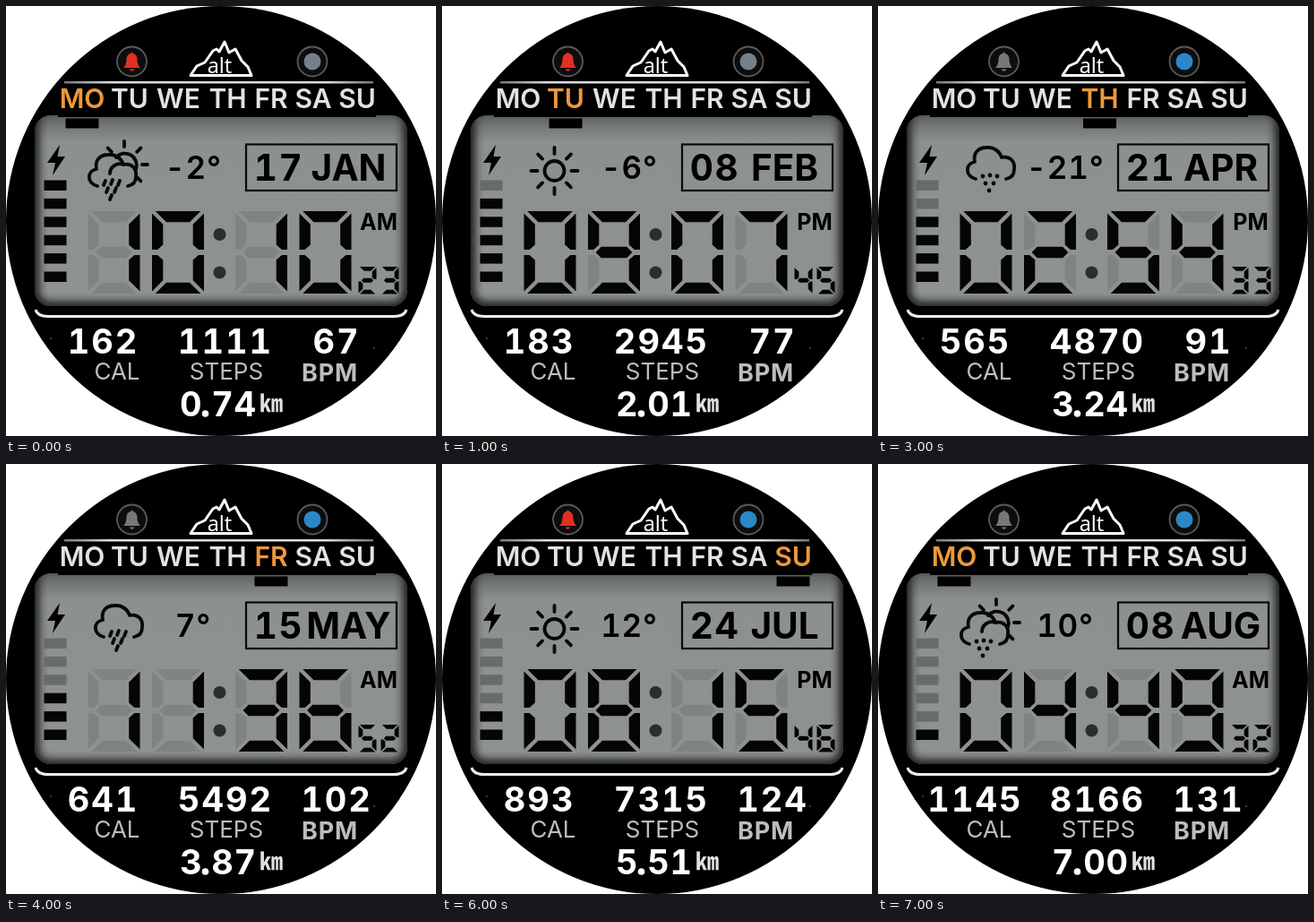
Animation, 480 px wide and 480 px high, one loop 8000 ms. Source, as an HTML page:

```html
<!DOCTYPE html>
<html lang="en">
<head>
<meta charset="utf-8">
<title>Digital watch face</title>
<style>
  html, body { margin: 0; width: 100%; height: 100%; overflow: hidden; background: #fff; }
  svg { display: block; width: 100vw; height: 100vh; }
  text { font-family: Inter, "Liberation Sans", sans-serif; font-feature-settings: "tnum"; }
  .mid { text-anchor: middle; }
  .day { font-size: 30px; font-weight: 600; fill: #e2e2e2; }
  .day.on { fill: #ee983a; }
  .date { font-size: 40.5px; font-weight: 700; }
  #date { letter-spacing: 1.5px; }
  .temp { font-size: 35px; font-weight: 600; letter-spacing: .8px; }
  .half { font-size: 25px; font-weight: 700; }
  .num { font-size: 38px; font-weight: 700; letter-spacing: 2px; fill: #fff; }
  .dist { font-size: 38px; font-weight: 700; letter-spacing: .6px; fill: #fff; }
  .label { font-size: 26px; fill: #bdbdbd; }
  .wide { font-size: 27px; font-weight: 700; letter-spacing: .8px; }
  .unit { font: 700 26px "Noto Sans CJK JP", "Noto Sans CJK SC", sans-serif; fill: #e0e0e0; }
  .alt { font: 500 23.5px "Noto Sans", "Open Sans", sans-serif; fill: #fff; }
  .line { fill: none; stroke: #080808; stroke-width: 3.8; stroke-linecap: round; stroke-linejoin: round; }
</style>
</head>
<body>
<svg viewBox="0 0 480 480">
  <defs>
    <filter id="soft" x="-10%" y="-10%" width="120%" height="120%"><feGaussianBlur stdDeviation="4.5"/></filter>
    <clipPath id="glass"><rect x="32" y="122" width="416" height="213" rx="18"/></clipPath>
    <linearGradient id="lcd" x2="0" y2="1">
      <stop offset="0" stop-color="#5c5f5f"/>
      <stop offset=".06" stop-color="#757878"/>
      <stop offset=".14" stop-color="#8c9090"/>
      <stop offset="1" stop-color="#8e9292"/>
    </linearGradient>
    <linearGradient id="rule">
      <stop offset="0" stop-color="#777"/>
      <stop offset=".15" stop-color="#ddd"/>
      <stop offset=".85" stop-color="#ddd"/>
      <stop offset="1" stop-color="#777"/>
    </linearGradient>
  </defs>

  <circle cx="240" cy="240" r="240"/>
  <g fill="#0d0d0d" stroke="#5a5a5a" stroke-width="1.8">
    <circle cx="140.500" cy="62" r="16.500"/>
    <circle cx="342" cy="62" r="16.500"/>
  </g>
  <g id="bell">
    <path d="M131 69Q134.500 66 134.500 59Q135 54 139 53Q140.500 50 142 53Q146 54 146.500 59Q146.500 66 150 69Z"/>
    <path d="M137.500 70.500H143.500Q140.500 75 137.500 70.500Z"/>
  </g>
  <circle id="link" cx="342" cy="62" r="9.500"/>
  <path d="M206 77.500L213 67L222 63L231 50L235 48L238 51L244 40L249 52L256 48L263 61L270 68L274 77.500Z"
    fill="none" stroke="#fff" stroke-width="3" stroke-linejoin="round"/>
  <text class="alt mid" x="238.500" y="74.500">alt</text>
  <rect x="65" y="84" width="345" height="2.500" fill="url(#rule)"/>
  <g id="days"></g>

  <g clip-path="url(#glass)">
    <rect x="32" y="122" width="416" height="213" fill="url(#lcd)"/>
    <rect x="31" y="110" width="418" height="226" rx="18" fill="none" stroke="#222424" stroke-width="13" filter="url(#soft)"/>
  </g>
  <rect x="58" y="118" width="355" height="6"/>
  <rect id="mark" y="125.500" width="37" height="11"/>
  <path d="M60 155L46 175H55L52 189L66 168H57.500Z"/>
  <g id="cells"></g>
  <g id="sky" class="line"></g>
  <text id="temp" class="temp mid" x="209" y="192.500"></text>
  <rect x="268" y="154.500" width="168" height="51.500" fill="none" stroke="#0a0a0a" stroke-width="2.200"/>
  <text id="date" class="date mid" x="304.500" y="195"></text>
  <text id="month" class="date mid" x="382.500" y="195"></text>
  <g id="time"></g>
  <g fill="#2c2e2e"><circle cx="238.500" cy="255" r="7"/><circle cx="238.500" cy="297.500" r="7"/></g>
  <text id="half" class="half mid" x="416" y="250"></text>
  <g id="secs"></g>

  <path d="M33 339Q35 346.500 47 346.500H433Q445 346.500 447 339" fill="none" stroke="#eee" stroke-width="3"/>
  <g fill="#8a3c12"><circle cx="50" cy="371" r="1"/><circle cx="411" cy="382" r="1"/></g>
  <text id="cal" class="num mid" x="108.500" y="387.500"></text>
  <text id="steps" class="num mid" x="245" y="387.500"></text>
  <text id="bpm" class="num mid" x="369" y="387.500"></text>
  <text class="label mid" x="124" y="416.500">CAL</text>
  <text class="label mid" x="246" y="416.500">STEPS</text>
  <text class="label wide mid" x="361.500" y="419">BPM</text>
  <text id="whole" class="dist mid" x="206.500" y="458">0</text>
  <circle cx="222.500" cy="455" r="3.800" fill="#fff"/>
  <text id="part" class="dist mid" x="254.500" y="458"></text>
  <text class="unit" x="283" y="453">㎞</text>
</svg>
<script>
const STEP = 1000;
const keys = "day date month temp time half secs cells cal steps bpm dist sky bell link".split(" ");
const table = [
  "MO 17 JAN -2 1010 AM 23 6 162 1111 67 0.74 sunRain 1 0",
  "TU 08 FEB -6 0907 PM 45 5 183 2945 77 2.01 sun 1 0",
  "WE 23 MAR 5 1002 AM 29 4 486 3203 83 2.79 rain 0 1",
  "TH 21 APR -21 0254 PM 33 4 565 4870 91 3.24 snow 0 1",
  "FR 15 MAY 7 1136 AM 52 3 641 5492 102 3.87 rain 0 1",
  "SA 18 JUN 8 0327 PM 19 3 717 6483 112 4.26 sunSnow 1 1",
  "SU 24 JUL 12 0815 PM 46 2 893 7315 124 5.51 sun 1 1",
  "MO 08 AUG 10 0449 AM 32 1 1145 8166 131 7.00 sunSnow 0 1"
].map(row => Object.fromEntries(row.split(" ").map((v, i) => [keys[i], v])));

const dayNames = ["MO", "TU", "WE", "TH", "FR", "SA", "SU"];
const dayX = [85, 138, 192.5, 247.5, 296, 343, 392];
const lit = ["abcdef", "bc", "abged", "abgcd", "fgbc", "afgcd", "afgedc", "abc", "abcdefg", "abcdfg"];
const $ = id => document.getElementById(id);

// Seven mitred bars in a box of w by h, each t thick.
function segments(w, h, t) {
  const m = h / 2, k = t / 2;
  const side = (x, dir, y0, y1) => {
    const s = Math.sign(y1 - y0), inner = x + dir * t;
    return [[x, y0 + s * t * .2], [inner, y0 + s * t * 1.2], [inner, y1 - s * t * .7],
            [x + dir * k, y1 - s * t * .25], [x, y1 - s * t * .25]];
  };
  const cap = (y, dir) => [[t * .3, y], [w - t * .3, y], [w - t * 1.3, y + dir * t], [t * 1.3, y + dir * t]];
  return {
    a: cap(0, 1),
    b: side(w, -1, 0, m),
    c: side(w, -1, h, m),
    d: cap(h, -1),
    e: side(0, 1, h, m),
    f: side(0, 1, 0, m),
    g: [[t * .7, m], [t * 1.2, m - k], [w - t * 1.2, m - k], [w - t * .7, m], [w - t * 1.2, m + k], [t * 1.2, m + k]]
  };
}

function digits(text, xs, y, shape, ghost) {
  return [...text].map((ch, i) => {
    const parts = Object.entries(shape).map(([name, pts]) => {
      const on = lit[ch].includes(name);
      if (!on && (!ghost || (name === "g" && "07".includes(ch)))) return "";
      return `<polygon points="${pts.join(" ")}" fill="${on ? "#050505" : "#7f8383"}"/>`;
    });
    return `<g transform="translate(${xs[i]} ${y})">${parts.join("")}</g>`;
  }).join("");
}

const big = segments(58, 92, 12.3), small = segments(20, 30.5, 4.8);
const path = d => `<path d="${d}"/>`;
const cloud = path("M109 193C97 190 97 176 108 174C106 164 112 158 121 158C130 157 136 163 138 169C148 167 153 174 152 182C152 188 149 192 143 193");
const rays = (cx, cy, r0, r1, from, count) => Array.from({ length: count }, (_, i) => {
  const a = (from + i * 45) * Math.PI / 180, c = Math.cos(a), s = Math.sin(a);
  return path(`M${cx + r0 * c} ${cy + r0 * s}L${cx + r1 * c} ${cy + r1 * s}`);
}).join("");
const drops = [[117, 190], [125, 189], [133, 190], [120, 198], [129, 198], [124, 206]];
const rain = drops.map(([x, y]) => path(`M${x + 1} ${y - 3}L${x - 1} ${y + 2}`)).join("");
const snow = drops.map(([x, y]) => `<circle cx="${x}" cy="${y}" r="2.400" fill="#080808" stroke="none"/>`).join("");
const behind = fall => path("M123 169A13 13 0 0 1 145 182") + rays(132, 177, 20, 26, -135, 5) +
  `<g transform="translate(-7 8)">${cloud}${path("M123 179A11 11 0 0 1 138 169")}${fall}</g>`;
const skies = {
  sun: `<circle cx="125.500" cy="184" r="11"/>` + rays(125.5, 184, 19, 26, 0, 8),
  rain: cloud + rain,
  snow: cloud + snow,
  sunRain: behind(rain),
  sunSnow: behind(snow)
};

$("days").innerHTML = dayNames.map((d, i) => `<text class="day mid" x="${dayX[i]}" y="114">${d}</text>`).join("");
$("cells").innerHTML = Array.from({ length: 6 }, (_, i) =>
  `<rect x="42.500" y="${194.5 + i * 20.4}" width="25" height="11.500"/>`).join("");

function show(s) {
  const day = dayNames.indexOf(s.day);
  [...$("days").children].forEach((el, i) => el.classList.toggle("on", i === day));
  $("mark").setAttribute("x", dayX[day] - 18.5);
  [...$("cells").children].forEach((el, i) => el.setAttribute("fill", i >= 6 - s.cells ? "#050505" : "#686b6b"));
  for (const id of ["date", "month", "half", "cal", "steps", "bpm"]) $(id).textContent = s[id];
  $("temp").textContent = s.temp + "°";
  [$("whole").textContent, $("part").textContent] = s.dist.split(".");
  $("time").innerHTML = digits(s.time, [91.5, 163, 256, 327.5], 229, big, true);
  $("secs").innerHTML = digits(s.secs, [393.5, 418.5], 291, small, false);
  $("sky").innerHTML = skies[s.sky];
  $("bell").setAttribute("fill", s.bell === "1" ? "#e03024" : "#777");
  $("link").setAttribute("fill", s.link === "1" ? "#2c86c8" : "#74808a");
}

const start = performance.now();
let shown = -1;
function tick() {
  const i = Math.floor((performance.now() - start) / STEP) % table.length;
  if (i !== shown) show(table[shown = i]);
  requestAnimationFrame(tick);
}
tick();
</script>
</body>
</html>
```
